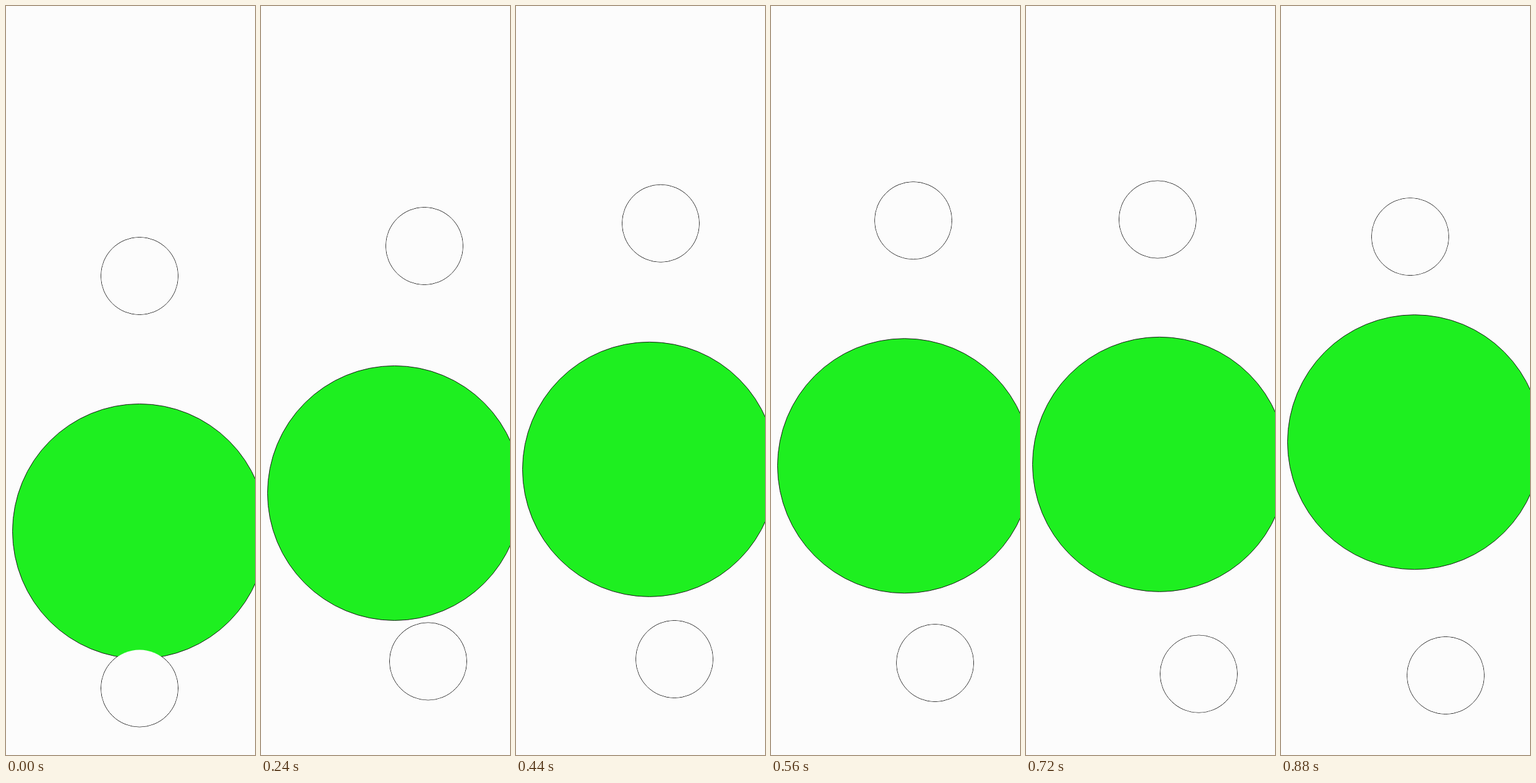
An HTML page with a canvas for the animation above (920 ms loop, 400 by 1200 pixels).

```html
<!DOCTYPE html>
<html lang="en">
<head>
<meta charset="utf-8">
<title>Drifting circles</title>
<style>
html, body { margin: 0; width: 100%; height: 100%; overflow: hidden; background: #fcfcfc; }
canvas { display: block; width: 400px; height: 1200px; }
</style>
</head>
<body>
<canvas id="stage" width="400" height="1200"></canvas>
<script>
const ctx = document.getElementById('stage').getContext('2d');
const LOOP = 920, STEP = 40;
const PAPER = '#fcfcfc', GREEN = '#1eef20', INK = '#1c1c1c';
const MID = 214.5, BIG = 204, SMALL = 62;

// Smooth move from 0 to 1 between times a and b.
function ease(t, a, b) {
  const u = Math.min(1, Math.max(0, (t - a) / (b - a)));
  return u * u * (3 - 2 * u);
}

// Sudden push at time a that dies away.
const push = (t, a, decay) => t < a ? 0 : 1 - Math.exp((a - t) / decay);

const topBall = t => [
  MID + 48 * ease(t, 130, 240) - 30 * ease(t, 240, 360) - 25 * ease(t, 480, 800),
  432.5 - 91 * push(t, 159, 108) + 28 * ease(t, 720, 880)
];

const bigBall = t => [
  MID,
  841.5 - 108 * push(t, 140, 120) - 35 * ease(t, 720, 880)
];

const lowBall = t => [
  MID + 54 * ease(t, 130, 240) - 14 * ease(t, 240, 360)
    + 23 * ease(t, 440, 720) - 13 * ease(t, 720, 880),
  1093 - 46.5 * ease(t, 140, 260) + 26 * ease(t, 460, 780)
];

function circle([x, y], r, fill, stroke) {
  ctx.beginPath();
  ctx.arc(x, y, r, 0, Math.PI * 2);
  if (fill) {
    ctx.fillStyle = fill;
    ctx.fill();
  }
  if (stroke) {
    ctx.strokeStyle = stroke;
    ctx.stroke();
  }
}

function draw(t) {
  ctx.fillStyle = PAPER;
  ctx.fillRect(0, 0, 400, 1200);
  const small = [topBall(t), lowBall(t)];
  // Outlines lie below the big disc, pale discs above it.
  for (const p of small) circle(p, SMALL, null, INK);
  circle(bigBall(t), BIG, GREEN, INK);
  for (const p of small) circle(p, SMALL - 0.5, PAPER);
}

const start = performance.now();
function frame() {
  const t = (performance.now() - start) % LOOP;
  draw(Math.floor(t / STEP) * STEP);
  requestAnimationFrame(frame);
}
frame();
</script>
</body>
</html>
```
